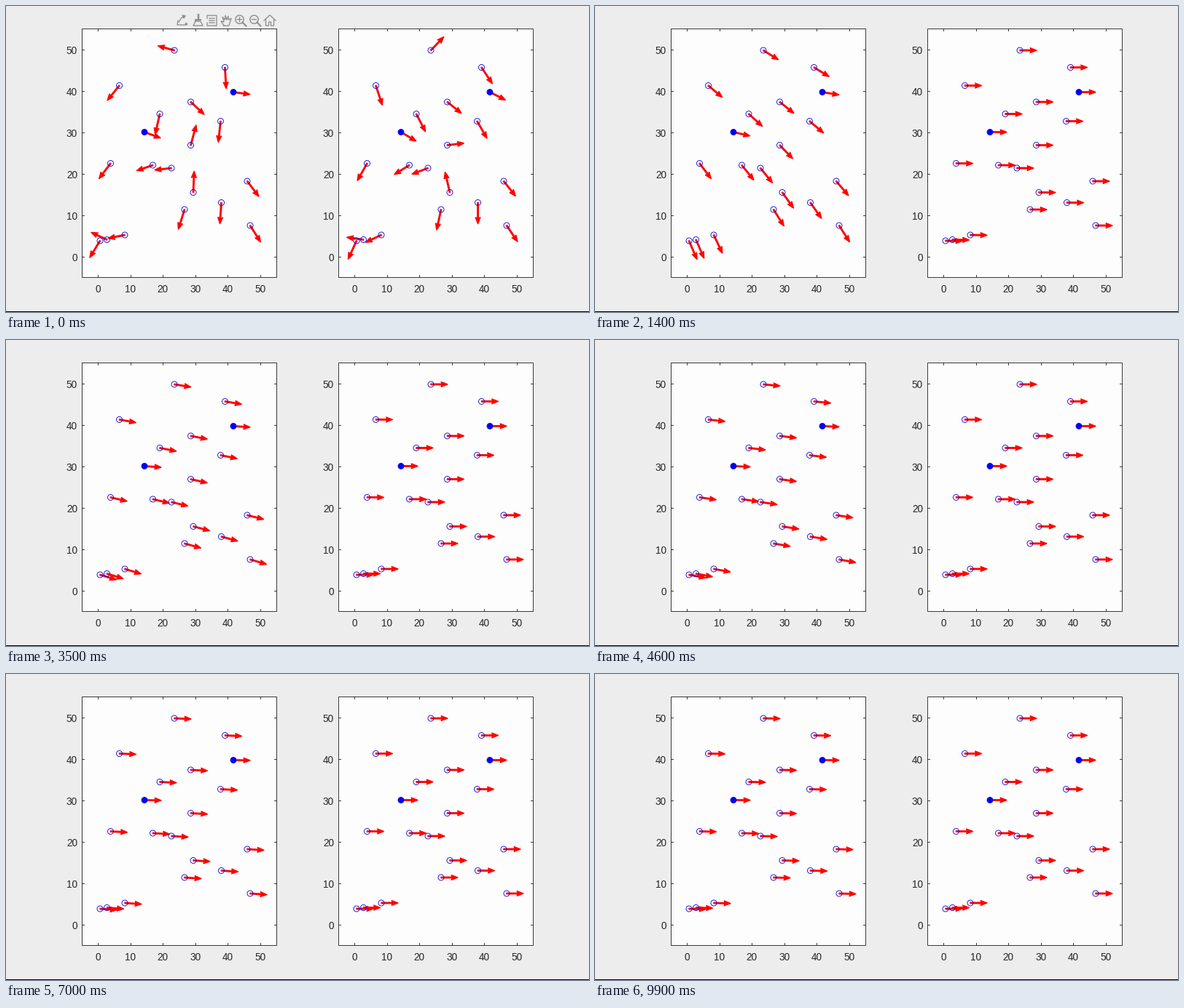
A matplotlib script that plays this animation: 800 by 421 pixels, repeating every 10 s.

```python
import numpy as np
import matplotlib.pyplot as plt
from matplotlib.animation import FuncAnimation
from matplotlib.collections import PolyCollection
from matplotlib.patches import Circle, Polygon, Rectangle

W, H, DPI = 800, 421, 100
FRAMES, STEP = 100, 100
PX = 72 / DPI               # points per pixel
SX, SY = 4.45, 5.7          # pixels per data unit
TOP, BOTTOM, WIDTH = 31.5, 373.5, 267
PANELS = (104.5, 456.5)
INK, GRAY = "#262626", "#8c8c8c"

# Agents: x, y and first heading in degrees, unwrapped to settle at zero.
AGENTS = np.array([
    (231, 61, 168), (300.5, 84.5, -86), (312, 118.5, -6), (155.5, 109.5, -136),
    (253.5, 132, -36), (211, 148.5, -106), (294.5, 158.5, -98),
    (190, 173.5, -16), (253.5, 191.5, 71), (143.5, 216.5, -134),
    (201.5, 219, -165), (227, 223, -175), (257, 256.5, -273), (331, 241, -46),
    (295.5, 270.5, -95), (245, 280, -112), (335, 302, -51), (163, 315, -171),
    (138.5, 321.5, -200), (129, 323, -128)])
X, Y, START = AGENTS.T
POS = AGENTS[:, :2]
LEADER = np.isin(np.arange(len(X)), (2, 7))
DEPTH = Y / 320

# Agents far from the leaders (low, left) lag behind the others.
T_MIX, T_LATE = 0.7, 2.2
SLOW_MIX = -(58 + 70 * DEPTH**1.3 - 0.115 * X) * np.where(LEADER, .2, 1)
SLOW_LATE = -(15 + 15 * DEPTH**1.5) * np.where(LEADER, .35, 1)
FAST_START = START + np.where(Y < 200, .65, .08) * (-30 - START)
FAST_MIX = -14 * DEPTH**3 * np.exp((129 - X) / 160) * np.where(LEADER, .2, 1)


def blend(a, b, t, rate=3):
    return a + (b - a) * (1 - np.exp(-rate * t)) / (1 - np.exp(-rate * T_MIX))


def slow(t):
    if t < T_MIX:
        return blend(START, SLOW_MIX, t)
    if t < T_LATE:
        return SLOW_MIX * (SLOW_LATE / SLOW_MIX) ** ((t - T_MIX) / (T_LATE - T_MIX))
    return SLOW_LATE * np.exp(-0.66 * (t - T_LATE) ** 0.77)


def fast(t):
    if t < T_MIX:
        return blend(FAST_START, FAST_MIX, t)
    return FAST_MIX * np.exp(-4 * (t - T_MIX))


def arrows(origin, degrees):
    a = np.radians(degrees)
    vec = 5 * np.column_stack([SX * np.cos(a), -SY * np.sin(a)])
    size = np.hypot(*vec.T)
    along = vec / size[:, None]
    side = np.column_stack([-along[:, 1], along[:, 0]])
    shapes = []
    for p, n, d, s in zip(origin, size, along, side):
        half = [(0, .7), (n - 7, .7), (n - 8, 3.3), (n + .6, 0)]
        outline = half + [(u, -v) for u, v in half[-2::-1]]
        shapes.append([p + u * d + v * s for u, v in outline])
    return shapes


fig = plt.figure(figsize=(W / DPI, H / DPI), dpi=DPI, facecolor="#ededed")
ax = fig.add_axes((0, 0, 1, 1))
ax.set(xlim=(0, W), ylim=(H, 0))
ax.axis("off")


def line(xs, ys, color=INK, width=.9):
    return ax.plot(xs, ys, color=color, lw=width * PX, snap=False)[0]


def label(x, y, text, ha):
    ax.text(x, y, text, ha=ha, va="center_baseline", color=INK,
            family="Liberation Sans", size=13.6 * PX)


def panel(left):
    right = left + WIDTH
    ax.add_patch(Rectangle((left, TOP), WIDTH, BOTTOM - TOP, fc="#fdfdfe",
                           ec=INK, lw=.9 * PX, snap=False))
    for value in range(0, 51, 10):
        # ticks sit on pixel centres
        x = np.floor(left + (value + 5) * SX) + .5
        y = np.floor(BOTTOM - (value + 5) * SY) + .5
        for edge, d in ((TOP, 3), (BOTTOM, -3)):
            line((x, x), (edge, edge + d))
        for edge, d in ((left, 3), (right, -3)):
            line((edge, edge + d), (y, y))
        label(x - .6, 388, str(value), "center")
        label(left - 6.5, y + .3, str(value), "right")


def toolbar():
    parts = []

    def stroke(*pts, width=1.3):
        parts.append(line(*zip(*pts), color=GRAY, width=width))

    def fill(*pts):
        parts.append(ax.add_patch(Polygon(pts, fc=GRAY, lw=0)))

    # export
    stroke((236, 20), (235, 26), (247, 26), (247, 23))
    stroke((237, 22), (241, 16), (245, 14))
    fill((241, 12), (247, 13), (244, 18))
    fill((245, 24), (250, 24), (247.5, 27))
    # brush
    stroke((264, 12), (264, 18), width=2.5)
    stroke((260, 19), (267, 19), width=2)
    stroke((260, 21), (257, 27), (270, 27), (267, 21), (260, 21))
    # data tip
    stroke((276, 17), (276, 13), (289, 13), (289, 27), (276, 27), (276, 23))
    for y in (17, 20, 23):
        stroke((279, y), (286, y))
    # hand
    stroke((299, 27), (295, 21), (299, 22), (297, 15), (300.5, 19), (301, 13),
           (303, 19), (305, 14), (305.5, 19), (309, 17), (306, 27), (299, 27))
    # zoom in and out
    for x in (320.5, 340.5):
        parts.append(ax.add_patch(Circle((x, 18.5), 5.7, fill=False, ec=GRAY,
                                         lw=1.4 * PX)))
        stroke((x + 4, 22.5), (x + 9, 27.5), width=2)
        stroke((x - 3, 18.5), (x + 3, 18.5))
    stroke((320.5, 15.5), (320.5, 21.5))
    # home
    stroke((354, 20), (362, 12.5), (370, 20))
    stroke((356.5, 19), (356.5, 27), (360.5, 27), (360.5, 22), (363.5, 22),
           (363.5, 27), (367.5, 27), (367.5, 19))
    return parts


fields = []
for left, heading in zip(PANELS, (slow, fast)):
    panel(left)
    origin = POS + (left - PANELS[0], 0)
    field = ax.add_collection(PolyCollection(
        arrows(origin, heading(0)), fc="red", ec="red", lw=1.5 * PX,
        joinstyle="round", zorder=3))
    fields.append((field, origin, heading))
    for p, lead in zip(origin, LEADER):
        ax.add_patch(Circle(p, 4, fc="blue" if lead else "none",
                            ec="#1010e0", lw=.9 * PX, zorder=4))
icons = toolbar()
ax.add_patch(Rectangle((0, 420), W, 1, fc="black", lw=0))


def update(k):
    for field, origin, heading in fields:
        field.set_verts(arrows(origin, heading(k * STEP / 1000)))
    for part in icons:
        part.set_visible(k == 0)
    return [field for field, *_ in fields] + icons


anim = FuncAnimation(fig, update, frames=FRAMES, interval=STEP,
                     repeat=True, repeat_delay=0, blit=False)
plt.show()
```
